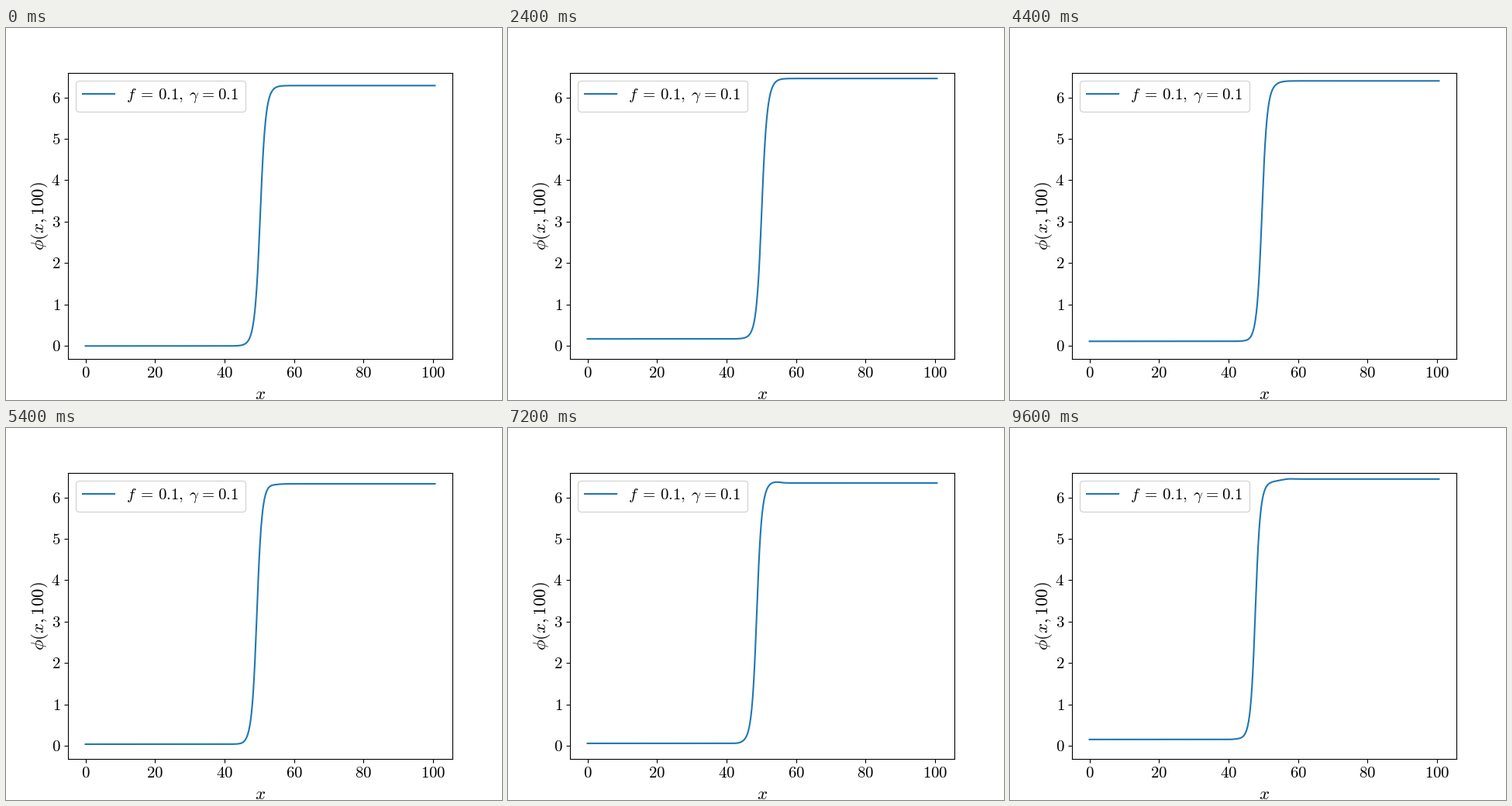
Recreate the animation shown at these times as a matplotlib script. Size 640 by 480 pixels, loop 9800 ms.

```python
import numpy as np
import matplotlib.pyplot as plt
from matplotlib.animation import FuncAnimation

plt.rcParams.update({
    "font.family": "Liberation Serif",
    "mathtext.fontset": "cm",
    "font.size": 15,
    "axes.labelsize": 16.5,
})

FRAMES, INTERVAL = 49, 200
FORCE, DAMPING = 0.1, 0.1
LENGTH = 32 * np.pi
FRAME_TIME, SUBSTEPS = 0.2, 10

x = np.linspace(0, LENGTH, 401)
dx = x[1]
dt = FRAME_TIME / SUBSTEPS


def acceleration(phi):
    """Undamped right-hand side of the driven sine-Gordon equation."""
    padded = np.pad(phi, 1, mode="edge")
    curvature = (padded[2:] - 2 * phi + padded[:-2]) / dx**2
    return curvature - np.sin(phi) + FORCE


def solve(start):
    """Leapfrog from rest, one profile per frame."""
    drag = DAMPING * dt / 2
    now = start
    before = start + acceleration(start) * dt**2 / 2
    profiles = []
    for _ in range(FRAMES):
        for _ in range(SUBSTEPS):
            after = (2 * now - (1 - drag) * before + dt**2 * acceleration(now)) / (1 + drag)
            before, now = now, after
        profiles.append(now)
    return profiles


kink = 4 * np.arctan(np.exp(x - LENGTH / 2))
profiles = solve(kink)

fig, ax = plt.subplots(figsize=(6.4, 4.8), dpi=100)
label = (r"$f\hspace{0.27}=\hspace{0.14}0.1,\hspace{0.23}"
         r"\gamma\hspace{0.1}=\hspace{0.04}0.1$")
line, = ax.plot(x, kink, label=label)

margin = 0.05
ax.set_xlim(-margin * LENGTH, (1 + margin) * LENGTH)
ax.set_ylim(-margin * 2 * np.pi, (1 + margin) * 2 * np.pi)
ax.set_xticks(range(0, 101, 20), [f"${v}$" for v in range(0, 101, 20)])
ax.set_yticks(range(7), [f"${v}$" for v in range(7)])
ax.set_xlabel(r"$x$", labelpad=5)
ax.set_ylabel(r"$\phi(x,100)$", labelpad=0.8)
ax.legend(loc="upper left", handletextpad=0.72)


def draw(i):
    line.set_ydata(profiles[i])
    return line,


anim = FuncAnimation(fig, draw, frames=FRAMES, interval=INTERVAL, repeat=True)
plt.show()
```
